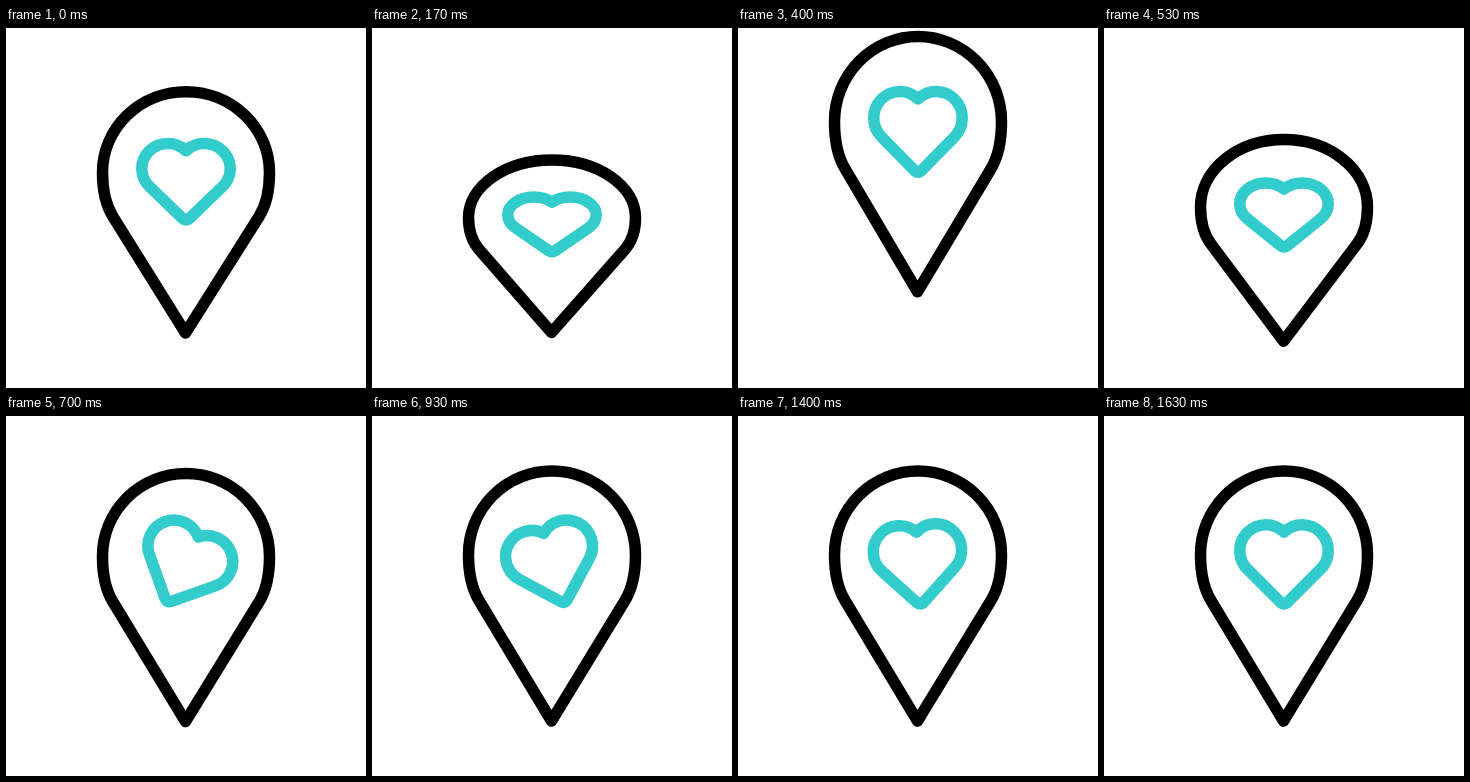
An HTML page that plays this animation: 360x360 px, repeating every 1.67 s.

```html
<!DOCTYPE html>
<html lang="en">
<head>
<meta charset="utf-8">
<title>Bouncing heart pin</title>
<style>
  html, body { margin: 0; width: 100%; height: 100%; overflow: hidden; background: #fff; }
  svg { display: block; }
  path {
    fill: none;
    stroke-width: 11.5;
    stroke-linejoin: round;
    vector-effect: non-scaling-stroke;
  }
  #outline { stroke: #000; }
  #heart { stroke: #33cccc; }
</style>
</head>
<body>
<svg width="360" height="360" viewBox="0 0 360 360">
  <g id="pin">
    <path id="outline" d="M179.5 305 L107 184.5 C100 173 96.5 157 96.5 138.5
      A83.5 83.5 0 0 1 263.5 138.5 C263.5 157 260 173 253 184.5 Z"/>
    <path id="heart" d="M176.5 186.3 L143.6 153.4 A26 26 0 0 1 180 116.2
      A26 26 0 0 1 216.4 153.4 L183.5 186.3 Q180 189.8 176.5 186.3 Z"/>
  </g>
</svg>
<script>
  const LOOP_MS = 1670, STEP_MS = 100 / 3, LAST_STEP = 49;
  const TIP_Y = 305, LANDING = 17;

  const pin = document.getElementById('pin');
  const heart = document.getElementById('heart');

  // Smooth progress from 0 to 1 between two steps.
  function progress(step, start, end) {
    const u = Math.min(1, Math.max(0, (step - start) / (end - start)));
    return u * u * (3 - 2 * u);
  }

  // Damped sway that begins on landing and dies out at the end of the loop.
  function swayAngle(step) {
    const since = Math.max(0, step - LANDING);
    const strength = 1 - since / (LAST_STEP - LANDING);
    return 31 * strength * Math.sin(2 * Math.PI * since / 13);
  }

  function draw(ms) {
    const step = Math.min(LAST_STEP, Math.floor((ms % LOOP_MS + 5) / STEP_MS));
    const crouch = progress(step, -1.2, 4.6);
    const leap = progress(step, 4.6, 11);
    const fall = progress(step, 11, 17.2);
    const settle = progress(step, 17.2, 21.5);

    const stretch = 1 - 0.314 * crouch + 0.353 * leap - 0.258 * fall + 0.219 * settle;
    const tipY = TIP_Y - 45.4 * leap + 59.4 * fall - 14 * settle;

    pin.setAttribute('transform',
      `translate(0 ${tipY}) scale(1 ${stretch}) translate(0 ${-TIP_Y})`);
    heart.setAttribute('transform', `rotate(${swayAngle(step)} 180 145)`);
  }

  const startTime = performance.now();
  function tick() {
    draw(performance.now() - startTime);
    requestAnimationFrame(tick);
  }
  tick();
</script>
</body>
</html>
```
